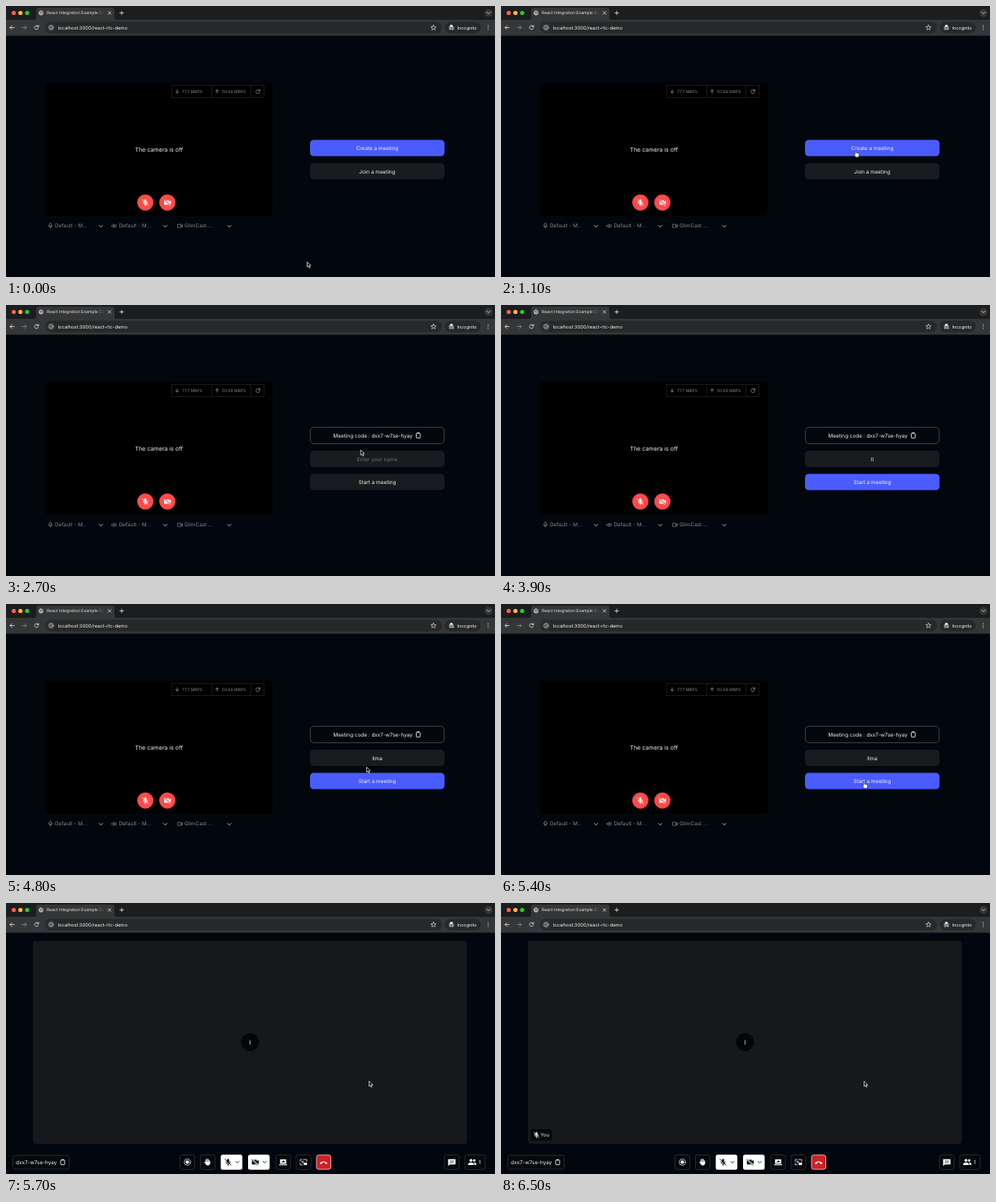
These frames come from a looping animation (600x333 px, 7400 ms). An HTML page:

```html
<!DOCTYPE html>
<html lang="en">
<head>
<meta charset="utf-8">
<title>Meeting demo</title>
<style>
  html, body { margin: 0; width: 100%; height: 100%; overflow: hidden; background: #01070d; }
  svg { display: block; width: 600px; height: 333px; }
  text { font-family: Inter, "Open Sans", sans-serif; font-size: 6.4px; fill: #f4f4f5; text-rendering: geometricPrecision; }
  .mid { text-anchor: middle; }
  .dim { fill: #85878b; }
  .line { fill: none; stroke: #dcdcde; stroke-width: .85; stroke-linecap: round; stroke-linejoin: round; }
  .thin { stroke-width: .7; }
  .gray { stroke: #85878b; }
  .edge { fill: none; stroke: #1f2022; stroke-width: .8; }
  .dark { fill: #191b1e; }
  .blue { fill: #4a5cff; }
  .bar { fill: #353637; }
  .pill { fill: #272829; }
  .tool { fill: #06080b; stroke: #303236; stroke-width: .8; }
  .white { fill: #fff; }
</style>
</head>
<body>
<svg viewBox="0 0 600 333">
  <defs>
    <path id="chevron" d="M-2-1 0 1 2-1"/>
    <g id="copy" fill="none" stroke="#eee" stroke-width=".9">
      <rect x="-2.4" y="-2.6" width="4.8" height="5.8" rx=".7"/><path d="M-1.2-2.9h2.4" stroke-width="1.4"/>
    </g>
    <g id="micOff" fill="none" stroke="currentColor" stroke-width=".9" stroke-linecap="round">
      <rect x="-1.3" y="-4" width="2.6" height="5" rx="1.3" fill="currentColor" stroke="none"/>
      <path d="M-2.7-.5a2.7 2.7 0 0 0 5.4 0M0 2.3V4M-3.8-3.6 3.8 3.8"/>
    </g>
    <g id="camOff">
      <path d="M-4-2.8h6v2l2.3-1.9v5.4L2 .8v2h-6z" fill="currentColor"/>
      <path d="M-4.2-3.8 3.8 4.2" stroke="var(--back)" stroke-width="1.8"/>
      <path d="M-4.4-3.6 3.6 4.2" stroke="currentColor" stroke-width=".8"/>
    </g>
    <linearGradient id="fade" gradientUnits="userSpaceOnUse" x1="110" x2="121">
      <stop stop-color="#e6e6e6"/><stop offset="1" stop-color="#e6e6e6" stop-opacity="0"/>
    </linearGradient>
    <linearGradient id="smoke" gradientUnits="userSpaceOnUse" x1="258" y1="184" x2="284" y2="220">
      <stop stop-color="#e6dcf4"/><stop offset=".3" stop-color="#fbf3f4"/><stop offset=".65" stop-color="#f0dfe2"/><stop offset="1" stop-color="#dc9d9f"/>
    </linearGradient>
  </defs>

  <g id="browser">
    <rect width="600" height="18" fill="#1c1d1e"/>
    <path class="bar" d="M34 17q3 0 3-3V5q0-3 3-3h90q3 0 3 3v9q0 3 3 3v1H34z"/>
    <rect class="bar" y="17" width="600" height="19.5"/>
    <circle cx="9.5" cy="8.5" r="2.6" fill="#ff5f57"/>
    <circle cx="17.7" cy="8.5" r="2.6" fill="#febc2e"/>
    <circle cx="26" cy="8.5" r="2.6" fill="#28c840"/>
    <circle cx="43" cy="8.5" r="2.9" fill="#b4b6b9"/>
    <path d="M41 7l2 1v2m1.5-4-.5 1.5 1.5 1" fill="none" stroke="#45484c" stroke-width=".8"/>
    <text x="50" y="10.4" style="font-size:5.1px;fill:url(#fade)">React Integration Example Co</text>
    <path class="line" d="M125.3 6.8l3.4 3.4m0-3.4-3.4 3.4M142 6.3v4.4m-2.2-2.2h4.4"/>
    <circle class="bar" cx="592" cy="8.5" r="5"/>
    <use href="#chevron" class="line" x="592" y="8.5"/>
    <path class="line" d="M10 26.500H5m2.300-2.300L5 26.500l2.300 2.300M39.600 25.300a2.400 2.400 0 1 0 .1 2M40 23.800v1.800h-1.800"/>
    <path class="line gray" d="M20 26.500h5m-2.300-2.300 2.300 2.300-2.300 2.300"/>
    <rect class="pill" x="48" y="19.5" width="487" height="14" rx="7"/>
    <circle class="bar" cx="55.3" cy="26.5" r="5"/>
    <g class="line thin">
      <circle cx="55.3" cy="26.5" r="2.6"/>
      <path d="M55.3 26.4v1.3m0-2.6v.1M524.5 23.400l.9 2 2.200.2-1.700 1.500.5 2.200-1.900-1.200-1.900 1.200.5-2.200-1.700-1.500 2.200-.2z"/>
    </g>
    <rect class="pill" x="538.5" y="19.5" width="44" height="14" rx="7"/>
    <path d="M544.3 25.700l.8-2.500h2.800l.8 2.500z" fill="#eee"/>
    <g class="line thin">
      <path d="M543.5 26.200h6"/><circle cx="545" cy="28.300" r="1"/><circle cx="548" cy="28.300" r="1"/>
    </g>
    <text x="63.7" y="28.600" style="font-size:5.8px">localhost:3000/react-rtc-demo</text>
    <text x="553.5" y="28.500" style="font-size:5.5px">Incognito</text>
    <path class="line" d="M591.6 24.200v.01m0 2.290v.01m0 2.290v.01" style="stroke-width:1.2"/>
  </g>

  <g id="lobby">
    <rect x="48" y="94.500" width="279" height="163" rx="4" fill="#000"/>
    <rect class="edge" x="203.500" y="97.500" width="113" height="15"/>
    <path class="edge" d="M252.500 97.500v15m48-15v15"/>
    <path class="line gray" d="M210 103v4m-1.600-1.600L210 107l1.600-1.600M259 107v-4m-1.600 1.600L259 103l1.600 1.600M311.200 104a2.400 2.400 0 1 0 .2 1.800m.1-3.200v1.700h-1.700"/>
    <text class="dim" x="216" y="107" style="font-size:5px">77.7 MBPS</text>
    <text class="dim" x="265" y="107" style="font-size:5px">50.69 MBPS</text>
    <text class="mid" x="187.700" y="178.800" style="font-size:7.1px">The camera is off</text>
    <g style="color:#fff;--back:#ff4a4a">
      <circle cx="171" cy="241.500" r="10" fill="#ff4a4a"/><use href="#micOff" x="171" y="241.500"/>
      <circle cx="198" cy="241.500" r="10" fill="#ff4a4a"/><use href="#camOff" x="198" y="241.500"/>
    </g>
    <g class="line gray thin">
      <rect x="53.300" y="267" width="2.400" height="4" rx="1.200"/><path d="M52.300 269.500a2.200 2.200 0 0 0 4.400 0m-2.200 2.300v1.200"/>
      <path d="M130.200 269.300h1l1.400-1.300v4.400l-1.400-1.300h-1zM133.800 269.200q.8 1 0 2m1.100-2.800q1.300 1.800 0 3.600"/>
      <path d="M211 268.200h3.800v4H211zm3.800 1.600 1.700-1.100v3l-1.700-1.100"/>
    </g>
    <g class="line"><use href="#chevron" x="116.500" y="270.600"/><use href="#chevron" x="195.300" y="270.600"/><use href="#chevron" x="274" y="270.600"/></g>
    <text class="dim" x="60" y="272.400">Default - M...</text>
    <text class="dim" x="138.500" y="272.400">Default - M...</text>
    <text class="dim" x="219" y="272.400">GlimCast ...</text>
  </g>

  <g id="choice">
    <rect class="blue" x="373" y="164.500" width="165" height="20" rx="4.500"/>
    <text class="mid" x="455.500" y="177">Create a meeting</text>
    <rect class="dark" x="373" y="193" width="165" height="20" rx="4.500"/>
    <text class="mid" x="455.500" y="205.500">Join a meeting</text>
  </g>

  <g id="form">
    <rect x="373.400" y="150.200" width="164.200" height="20.200" rx="4.500" fill="none" stroke="#595d5c" stroke-width=".7"/>
    <text x="401.500" y="162.800">Meeting code : dxx7-w7se-hyay</text>
    <use href="#copy" x="505.800" y="160.200"/>
    <rect class="dark" x="373" y="179" width="165" height="20" rx="4.500"/>
    <text id="name" class="mid" x="455.500" y="191.500"></text>
    <rect id="start" x="373" y="207.500" width="165" height="20" rx="4.500"/>
    <text class="mid" x="455.500" y="220">Start a meeting</text>
  </g>

  <g id="loading">
    <g fill="url(#smoke)">
      <circle cx="262" cy="193" r="9"/><circle cx="272" cy="193" r="9"/><circle cx="282" cy="195" r="8.500"/>
      <circle cx="292" cy="195" r="7.500"/><circle cx="266" cy="203" r="9"/><circle cx="272" cy="209" r="9"/><circle cx="281" cy="203" r="6.500"/>
    </g>
    <path d="M266 181v.1m11-2v.1m9 3v.1m6 25v.1m-9 5v.1" stroke="#8f4b48" stroke-linecap="round"/>
    <path d="M294 166q14 3 19 12l-11 5zM312 194l11-3q-1 16-7 21z" fill="#241c1e"/>
    <path d="M291 194l9-14 6 12-8 6z" fill="#f3cfc0"/>
    <path d="M297 194l3-10q18-21 44-20 5 3 1 12-11 21-36 23-7 0-12-5z" fill="#dc4340"/>
    <path d="M297 194l4-12 7 17q-7 0-11-5z" fill="#e8a088"/>
    <path d="M314 172l10 22m8-29 8 18" stroke="#f5bd62" stroke-width="2"/>
    <path d="M309 190q18-2 33-17" fill="none" stroke="#f6a08e" stroke-width="1.500"/>
    <path d="M307 151q7-5 13 1l1 16-13 3q-5-10-1-20z" fill="#dd4f3f"/>
    <path d="M308 154l5 3-3 5m6-8 2 6-4 4" fill="none" stroke="#f0a154" stroke-width="1.500"/>
    <path d="M307 167l14-2 2 5-9 5-5 15-6-1z" fill="#e77f4e"/>
    <path d="M303 186l5 2-1 5h-7z" fill="#ecd3dc"/>
    <path d="M316 152l14-1m-14 6 6 4h10" fill="none" stroke="#eba78a" stroke-width="2"/>
    <path d="M315 151l9 1" stroke="#dd4f3f" stroke-width="4"/>
    <path d="M329 149v-3h1.500v3h2.500v3.500h-4z" fill="#fff"/>
    <path d="M324 163l9 1 2-10 1.800.4-2 11-11-1z" fill="#c26a72"/>
    <circle cx="313" cy="143.500" r="4" fill="#d08b74"/>
    <circle cx="311" cy="138.500" r="3" fill="#3a2d34"/>
    <path d="M308 145q-2-6 3-7 5 0 6 3l-5 1.500-1 4z" fill="#3a2d34"/>
    <text class="mid" x="299.300" y="241.700" style="font-size:8.1px;font-weight:600">Creating a room for you...</text>
  </g>

  <g id="room">
    <rect x="33" y="46.500" width="532.500" height="249.500" rx="3.500" fill="#16181b"/>
    <circle cx="299.300" cy="171" r="11" fill="#02070c"/>
    <text class="mid" x="299.300" y="173.700" style="font-size:7.5px">I</text>
    <g id="label">
      <rect x="36.500" y="278" width="26" height="14" rx="2.500" fill="#05080c"/>
      <use href="#micOff" transform="translate(43.500 285) scale(.85)" color="#fff"/>
      <text x="48.500" y="287.200" style="font-size:6px">You</text>
    </g>
    <rect class="tool" x="8.500" y="310" width="69" height="17" rx="2.500"/>
    <text x="12" y="320.800">dxx7-w7se-hyay</text>
    <use href="#copy" x="69.500" y="318.400"/>
    <g class="tool">
      <rect x="213.500" y="309.500" width="18" height="18" rx="2.500"/><rect x="238.500" y="309.500" width="18" height="18" rx="2.500"/>
      <rect x="331" y="309.500" width="18" height="18" rx="2.500"/><rect x="356" y="309.500" width="18" height="18" rx="2.500"/>
      <rect x="538" y="309.500" width="18" height="18" rx="2.500"/><rect x="563" y="309.500" width="25" height="18" rx="2.500"/>
    </g>
    <circle class="line" cx="222.500" cy="318.400" r="3.800"/><circle class="white" cx="222.500" cy="318.400" r="2.100"/>
    <path class="line" style="stroke-width:1.2" d="M245.300 319v-3.500m1.500 3v-4m1.500 4v-3.500m1.500 4v-2.500"/>
    <path class="white" d="M244.700 318h5.700v2q-.5 2.600-2.700 2.600-1.700 0-2.600-1.600l-2-2.700q.6-.7 1.600.3z"/>
    <rect class="white" x="263.500" y="309.300" width="26.500" height="18.500" rx="2.500"/>
    <rect class="white" x="297" y="309.300" width="26.500" height="18.500" rx="2.500"/>
    <g style="color:#08090b;--back:#fff">
      <use href="#micOff" x="272.500" y="318.400"/><use href="#camOff" x="305.700" y="318.400"/>
    </g>
    <g class="line" style="stroke:#111"><use href="#chevron" x="284" y="318.500"/><use href="#chevron" x="317.500" y="318.500"/></g>
    <path class="white" d="M336.300 315h7.500v5.500h-7.500zM335 321.300h10v1h-10z"/>
    <path d="M338 319q.3-2 2.500-2v-1l1.800 1.700-1.800 1.600v-1q-1.500 0-2.500.7z" fill="#06080b"/>
    <path class="line" d="M361 317.500v-2.300h2m2 0h4v2.300M361 319.500v2.300h2.500m-.8-5 2 2m0-1.600v1.600h-1.600"/>
    <rect class="white" x="365.300" y="319" width="4" height="3"/>
    <rect x="381" y="309.700" width="17.500" height="17.500" rx="2.500" fill="#cf2027" stroke="#f0b9b9" stroke-width=".9"/>
    <path class="white" d="M385 319.500q4.700-4 9.500 0l-1.300 1.500-2-1.200v-1.100q-1.500-.5-3 0v1.100l-2 1.200z"/>
    <path class="white" d="M542.500 314.800h9v6.400h-6.800l-2.200 2z"/>
    <path d="M544.500 317h5m-5 2h5" stroke="#06080b" stroke-width=".7"/>
    <g class="white">
      <circle cx="570.500" cy="316.300" r="1.800"/><circle cx="574.500" cy="316.300" r="1.500"/>
      <path d="M567 322v-1q.5-2.200 3.500-2.200t3.500 2.200v1zM574.700 322v-1.200q0-1.200-1-2 3.200-.3 3.500 2v1.200z"/>
    </g>
    <text x="580" y="320.800" style="font-size:6.6px">1</text>
  </g>

  <g id="cursor">
    <path id="arrow" d="M0 0v6.200l1.500-1.300 1.100 2.400 1.100-.5-1.100-2.300h2z" fill="#000" stroke="#fff" stroke-width=".7"/>
    <path id="hand" d="M-.7 0q.8-.6 1.300.3v2l2.800.6q1 .3.900 1.200L4 5.800l-.7 1.700H.2l-2.200-3q.1-1 1.300-.2z" fill="#fff" stroke="#111" stroke-width=".5"/>
    <path id="beam" d="M-1.300-3Q0-3 0-2 0-3 1.300-3M0-2v4m-1.300 1Q0 3 0 2 0 3 1.300 3" fill="none" stroke="#ddd" stroke-width=".7"/>
  </g>
</svg>
<script>
const LOOP = 7400, STEP = 100;
const get = id => document.getElementById(id);
const show = (id, on) => get(id).style.display = on ? '' : 'none';

// time, x, y of the pointer's resting points
const path = [
  [0, 369.5, 314.5], [1000, 435.2, 178.2], [2700, 435.2, 178.2], [3200, 440, 189],
  [4700, 442, 199.2], [4800, 442.5, 200.4], [5100, 445.5, 219], [LOOP, 445.5, 219]
];
const ease = p => p * p * (3 - 2 * p);

function pointer(t) {
  const i = path.findIndex(point => point[0] > t);
  const [t0, x0, y0] = path[i - 1], [t1, x1, y1] = path[i];
  const p = ease((t - t0) / (t1 - t0));
  return [x0 + (x1 - x0) * p, y0 + (y1 - y0) * p];
}

function draw(t) {
  show('lobby', t < 5600);
  show('choice', t < 2000);
  show('form', t >= 2000 && t < 5600);
  show('loading', t >= 5600 && t < 5700);
  show('room', t >= 5700);
  show('label', t >= 6500);

  const typed = 'Ilma'.slice(0, Math.max(0, Math.floor((t - 3500) / 200)));
  get('name').textContent = typed || 'Enter your name';
  get('name').style.fill = typed ? '' : '#6d6f73';
  get('start').setAttribute('class', typed ? 'blue' : 'dark');

  const [x, y] = pointer(t);
  const onCreate = t < 1800 && y < 184.5;
  const onStart = t > 4800 && t < 5600 && y > 207.5;
  const onInput = t > 2700 && t < 4800 && y > 179;
  show('hand', onCreate || onStart);
  show('beam', onInput);
  show('arrow', !onCreate && !onStart && !onInput);
  show('cursor', t < 3700 || t >= 4800);
  get('cursor').setAttribute('transform', `translate(${x} ${y})`);
}

function tick() {
  const t = performance.now() % LOOP;
  draw(Math.floor(t / STEP) * STEP);
  requestAnimationFrame(tick);
}
tick();
</script>
</body>
</html>
```
